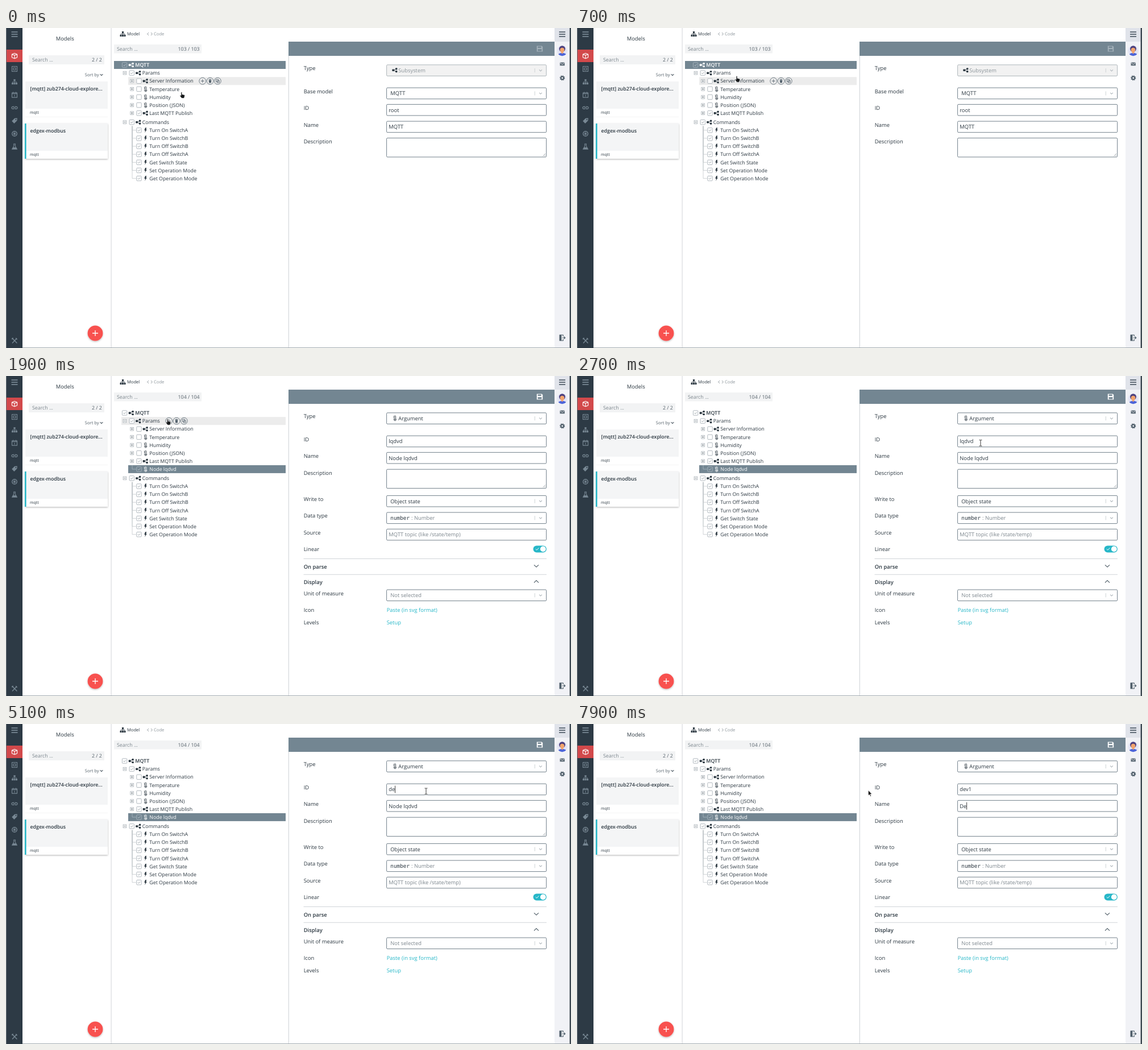
Write an HTML page that moves like this. It is 994 px wide and 563 px high and loops after 8000 ms.

```html
<!DOCTYPE html>
<html lang="en">
<head>
<meta charset="utf-8">
<title>Model editor</title>
<style>
html, body { margin: 0; width: 100%; height: 100%; overflow: hidden; background: #fff; }
svg { display: block; width: 100vw; height: 100vh; }
text { font-family: "Open Sans", "Noto Sans", sans-serif; text-rendering: geometricPrecision; white-space: pre; }
.mono { font-family: "DejaVu Sans Mono", monospace; }
</style>
</head>
<body>
<svg viewBox="0 0 994 563">
  <g id="frame"></g>
  <g id="live"></g>
</svg>
<script>
const LOOP = 8000;
const INK = '#2b3740', SLATE = '#738692', GREY = '#7b858c', EDGE = '#64737e', CYAN = '#27b7c8';
const NAV = '#2d3a45', NAV_ICON = '#788894';

const text = (x, cy, s, size = 9.4, fill = INK, extra = '') =>
  `<text x="${x}" y="${cy + size * 0.36}" font-size="${size}" fill="${fill}" ${extra}>${s}</text>`;
const rect = (x, y, w, h, fill, extra = '') =>
  `<rect x="${x}" y="${y}" width="${w}" height="${h}" fill="${fill}" ${extra}/>`;
const line = (d, stroke, width = 1, fill = 'none') =>
  `<path d="${d}" fill="${fill}" stroke="${stroke}" stroke-width="${width}" stroke-linejoin="round"/>`;
const fillPath = (d, fill) => `<path d="${d}" fill="${fill}" fill-rule="evenodd"/>`;
const circle = (x, y, r, fill, extra = '') => `<circle cx="${x}" cy="${y}" r="${r}" fill="${fill}" ${extra}/>`;
const at = (x, y, s) => `<g transform="translate(${x} ${y})">${s}</g>`;
const BOLD = 'font-weight="600"';

const pen = document.createElement('canvas').getContext('2d');
const widthOf = (s, size) => {
  pen.font = '100px "Open Sans", "Noto Sans", sans-serif';
  return pen.measureText(s).width * size / 100;
};

// Icons, drawn around their centre
const icon = {
  menu: c => line('M-5.5-4H5.5M-5.5 0H5.5M-5.5 4H5.5', c, 1.7),
  cube: c => line('M0-4.6L4.6-2.8V2.8L0 4.8L-4.6 2.8V-2.8ZM-4.6-2.8L0-1L4.6-2.8M0-1V4.8', c, 1.1),
  frame: c => line('M-4.5-4.5H4.5V4.5H-4.5ZM-2-2H2V2H-2Z', c, 1.1),
  sitemap: c => fillPath('M-1.6-4.5H1.6V-1.5H-1.6ZM-5 1.5H-2V4.5H-5ZM-1.5 1.5H1.5V4.5H-1.5ZM2 1.5H5V4.5H2Z', c) +
    line('M0-1.5V1.5M-3.5 1.5V0H3.5V1.5', c, .8),
  calendar: c => line('M-4.5-3.5H4.5V4.5H-4.5ZM-4.5-1.8H4.5M-2.4-5V-3M2.4-5V-3M0 0V2.8', c, 1.1),
  link: c => line('M-.6-2H-3A2 2 0 0 0-3 2H-.6M.6-2H3A2 2 0 0 1 3 2H.6M-2.2 0H2.2', c, 1.2),
  tag: c => fillPath('M-4.8 .6L.2-4.4L4.8-4.8L4.4-.2L-.6 4.8ZM2.3-3.3A1 1 0 1 0 2.4-3.3Z', c),
  globe: c => circle(0, 0, 4.3, 'none', `stroke="${c}" stroke-width="1.3"`) +
    line('M-3.5-2.4L3.5 2.4M3.5-2.4L-3.5 2.4M0-4V4', c, .8) + circle(0, 0, 1.6, c),
  flask: c => line('M-2-4.8H2M-1.2-4.8V-1L-4.4 4.5H4.4L1.2-1V-4.8', c, 1.1) + fillPath('M-2.3 1.3H2.3L4 4.3H-4Z', c),
  tools: c => line('M-4 4.4L4-4M-4.4-4.4L4.4 4.4M-4.8-2.4L-2.4-4.8M2.2-4.4L4.6-2', c, 1.4),
  share: c => rect(-4.6, -1.7, 3.6, 3.6, c, 'rx=".8"') + rect(1.2, -4, 3.2, 3.2, c, 'rx=".7"') +
    rect(1.2, .9, 3.2, 3.2, c, 'rx=".7"') + line('M-2 0L2-2.4M-2 0L2 2.4', c, .9),
  thermo: c => line('M-.8 .8V-3A1.2 1.2 0 0 1 1.6-3V.8A2 2 0 1 1-.8 .8Z', c, .9) +
    circle(.4, 2.3, 1, c) + line('M-2.6-3.4H-1.4M-2.6-1.4H-1.4', c, .7),
  bolt: c => fillPath('M-.4-4.4H2L.9-1.3H2.5L-1.1 4.5L-.2 .5H-2Z', c),
  add: c => line('M-3 0H3M0-3V3', c, .9),
  trash: c => fillPath('M-2.6-2.8H-1L-.7-3.4H.7L1-2.8H2.6V-2H-2.6ZM-2.2-1.6H2.2L1.9 3.3H-1.9Z', c),
  copy: c => line('M-3-3H1.2V1.2H-3ZM-1-1H3V3H-1Z', c, .8, '#ececec'),
  save: c => fillPath('M-5.2-5H3.6L5.2-3.4V5H-5.2ZM-3.4-4V-1.4H2.6V-4ZM-3.4 .8V4H3.4V.8Z', c),
  down: c => line('M-2.4-1.2L0 1.2L2.4-1.2', c, 1.1),
  code: c => line('M-2-2.4L-4.4 0L-2 2.4M2-2.4L4.4 0L2 2.4', c, 1),
  mail: c => rect(-4.2, -2.8, 8.4, 5.8, c, 'rx=".6"') + line('M-4.2-2.4L0 .8L4.2-2.4', '#f1f2f6', .8),
  gear: c => circle(0, 0, 2.4, 'none', `stroke="${c}" stroke-width="2"`) +
    circle(0, 0, 3.9, 'none', `stroke="${c}" stroke-width="1.3" stroke-dasharray="1.6 1.46"`),
  exit: c => line('M1.5-2.4V-5H-4.6V5H1.5V2.4', c, 1.2) + rect(-4.6, -5, 3.2, 10, c) + line('M0 0H5M3-2L5 0L3 2', c, 1.2)
};
const put = (name, x, y, c = INK) => at(x, y, icon[name](c));

function card(y, title, active) {
  return rect(34, y, 145, 62, '#fff', `filter="url(#${active ? 'lift' : 'rest'})"`) +
    rect(34, y, 145, 48, '#f4f5f6') + (active ? rect(33, y, 2.6, 62, CYAN) : '') +
    text(42.5, y + 12.5, title, 8.8, INK, BOLD) + text(42, y + 54.8, 'mqtt', 7);
}

function frame() {
  const shadow = (id, dy, blur, a) => `<filter id="${id}" x="-10%" y="-20%" width="120%" height="150%">
    <feDropShadow dx="0" dy="${dy}" stdDeviation="${blur}" flood-opacity="${a}"/></filter>`;
  let s = `<defs>${shadow('rest', .3, .5, .13)}${shadow('lift', 1.2, 1.8, .28)}</defs>`;
  s += rect(0, 0, 994, 563, '#fff') + rect(0, 0, 29, 563, NAV) + rect(0, 0, 1, 563, '#6a747c');
  s += rect(1, 38, 28, 22, '#d2494b') + put('menu', 15, 11, '#8494a0') + put('cube', 15, 49, '#fff');
  ['frame', 'sitemap', 'calendar', 'link', 'tag', 'globe', 'flask'].forEach((n, i) => {
    s += put(n, 15, 72 + i * 22.8, NAV_ICON);
  });
  s += put('tools', 15, 550, NAV_ICON);

  s += rect(184.5, 0, 1.2, 563, '#d9dcde') + text(87.7, 18.5, 'Models');
  s += rect(40, 48, 133, 16, '#f2f3f4') + text(46, 56, 'Search ...', 8.8, GREY) + text(151, 56, '2 / 2', 8.8, '#56626b');
  s += text(138.8, 82, 'Sort by', 7.6, '#56626b') + put('down', 168, 82.3, '#56626b');
  s += card(94, '[mqtt] zub274-cloud-explore...', false) + card(168, 'edgex-modbus', true);
  s += circle(157, 537, 13.4, '#f8514f', 'filter="url(#lift)"') + line('M152 537H162M157 532V542', '#fff', 1.3);

  s += put('sitemap', 205.5, 10.5) + text(213, 10.5, 'Model', 7.6);
  s += put('code', 253, 10.5, '#8b949a') + text(260, 10.5, 'Code', 7.6, '#8b949a');
  s += rect(190, 29, 154, 15.5, '#f2f3f4') + text(195, 37, 'Search ...', 8.8, GREY);
  s += rect(497, 24, 468, 25, SLATE) + rect(496.8, 49, 1, 514, '#cdd2d5');

  s += rect(965, 0, 29, 563, '#f1f2f6') + rect(965, 0, 27, 24, '#e0e3ea') + put('menu', 978.5, 11, '#3b4a55');
  s += circle(978.5, 40, 9.2, '#e3e4f4') + circle(978.5, 36.6, 5.4, '#4b3f7d') + circle(978.5, 38.6, 3.8, '#f3a46c') +
    fillPath('M971.8 46.3C973 42.8 984 42.8 985.2 46.3A9.2 9.2 0 0 1 971.8 46.3Z', '#4c64d8') +
    fillPath('M976.6 41H980.4V43.6L978.5 45.4L976.6 43.6Z', '#f3a46c');
  s += put('mail', 978.7, 63.3, '#5d6b76') + put('gear', 978.7, 88, '#4d5c68') + put('exit', 978.7, 545, '#4d5c68');
  s += rect(991.6, 0, 2.4, 563, '#3c4851') + rect(29, 562, 963, 1, '#a3abb1');
  return s;
}

const STEP = 14.13;
const action = ['Turn On SwitchA', 'Turn On SwitchB', 'Turn Off SwitchB', 'Turn Off SwitchA',
  'Get Switch State', 'Set Operation Mode', 'Get Operation Mode'];

// Rows: label, level, icon, checked, expander sign
function rowsFor(added) {
  const rows = [['MQTT', 0, 'share', 1, ''], ['Params', 1, 'share', 1, '-'],
    ['Server Information', 2, 'share', 0, '+'], ['Temperature', 2, 'thermo', 0, '+'],
    ['Humidity', 2, 'thermo', 0, '+'], ['Position (JSON)', 2, 'thermo', 0, '+'],
    ['Last MQTT Publish', 2, 'share', 1, '+']];
  if (added) rows.push(['Node lqdvd', 2, 'thermo', 1, '']);
  rows.push(['Commands', 1, 'share', 1, '-'], ...action.map(a => [a, 2, 'bolt', 1, '']));
  return rows;
}

function tree(added, hover) {
  const picked = added ? 'Node lqdvd' : 'MQTT';
  let s = '', y = 65, branch = 0;
  for (const [label, level, kind, checked, sign] of rowsFor(added)) {
    if (label === 'Commands') { y += 1.8; branch = y + 7; }
    const on = label === picked, over = label === hover;
    const left = [190, 203, 215][level], box = 208.6 + level * 12.7, x = 227.3 + level * 12.5;
    const ink = on ? '#fff' : INK, soft = on ? '#a9b6bf' : '#aab2b8';
    if (on || over) s += rect(left, y - 7, 492 - left, 14, on ? SLATE : '#ececec');
    if (sign) {
      const ex = box - 12.4;
      s += at(ex, y, rect(-2.8, -2.8, 5.6, 5.6, '#fff', 'stroke="#a5adb3" stroke-width=".8"') +
        line('M-1.7 0H1.7' + (sign === '+' ? 'M0-1.7V1.7' : ''), '#6b767e', .8));
    } else if (level) {
      s += line(`M222 ${on ? y - 7 : branch}V${y}H229`, on ? '#a9b6bf' : '#c3c8cc', .8);
    }
    s += at(box, y, rect(-4.2, -4.2, 8.4, 8.4, on ? 'none' : '#fff', `rx="1" stroke="${soft}" stroke-width=".9"`) +
      (checked ? line('M-2 0L-.5 1.5L2.2-1.4', on ? '#c6d0d6' : '#8f999f', .9) : ''));
    s += put(kind, x - 7, y, ink) + text(x, y, label, 8.8, ink, level ? '' : BOLD);
    if (over) {
      const end = x + widthOf(label, 8.8) + 16;
      ['add', 'trash', 'copy'].forEach((n, i) => {
        s += at(end + i * 13.3, y, circle(0, 0, 5.9, 'none', 'stroke="#63717b" stroke-width=".9"') + icon[n]('#56646f'));
      });
    }
    y += STEP;
  }
  return s;
}

const label = (y, s) => text(523.7, y, s);
const box = (y, h = 19.6, fill = '#fff', edge = EDGE) =>
  rect(669.6, y - 9.8, 281, h, fill, `rx="1.5" stroke="${edge}" stroke-width=".9"`);
const input = (y, s, fill = INK) => box(y) + text(673.2, y, s, 9.4, fill);
const select = (y, inner, off) => box(y, 19.6, off ? '#f2f2f2' : '#fff', off ? '#a6afb5' : EDGE) + inner +
  line(`M930.3 ${y - 3.6}V${y + 3.6}`, '#c9ced2', .9) + put('down', 940.5, y, '#b3babf');
const area = y => box(y, 33.4) + line(`M944.6 ${y + 22}L949 ${y + 17.6}M947.4 ${y + 22}L949 ${y + 20.4}`, '#77838b', .7);

// An input whose content may be selected or carry a caret
function edit(y, value, mode) {
  const w = widthOf(value, 9.4);
  if (mode === 'all') return box(y) + rect(673.2, y - 6.6, w, 13, '#3390ff') + text(673.2, y, value, 9.4, '#fff');
  return input(y, value) + (mode === 'caret' ? rect(673.2 + w, y - 6.5, .8, 13, '#111') : '');
}

function rootForm() {
  return label(71, 'Type') + select(74.6, put('share', 684, 74.2) + text(690.3, 74.6, 'Subsystem', 9.4, '#8a9399'), true) +
    label(111.4, 'Base model') + select(115, text(676.3, 115, 'MQTT')) +
    label(141, 'ID') + input(144.2, 'root') + label(170.5, 'Name') + input(173.9, 'MQTT') +
    label(199.8, 'Description') + area(203.4);
}

function nodeForm(id, idMode, name, nameMode) {
  return label(71, 'Type') + select(74.6, put('thermo', 684, 74.2) + text(690.3, 74.6, 'Argument')) +
    label(111.4, 'ID') + edit(115, id, idMode) + label(141, 'Name') + edit(144.2, name, nameMode) +
    label(170.5, 'Description') + area(174) +
    label(216.4, 'Write to') + select(220.2, text(676.3, 220.2, 'Object state')) +
    label(246, 'Data type') + select(249.8, text(676.3, 249.8, 'number', 9.4, INK, 'class="mono"') +
      text(713, 249.8, ': Number', 9.4, GREY)) +
    label(275.4, 'Source') + input(279.1, 'MQTT topic (like /state/temp)', GREY) +
    label(304.4, 'Linear') + rect(927.5, 298.4, 23.4, 12, CYAN, 'rx="6"') + circle(944.8, 304.4, 4.9, '#fff') +
    line('M931.8 304.3L933.8 306.2L937.4 302.4', '#fff', 1) +
    rect(523.5, 321, 427.5, .9, '#ccd1d5') + text(523.7, 335.8, 'On parse', 9.4, INK, BOLD) +
    line('M929 332.3L933 336.2L937 332.3', '#4b5963', 1.1) +
    rect(523.5, 348.8, 427.5, .9, '#ccd1d5') + text(523.7, 363, 'Display', 9.4, INK, BOLD) +
    line('M929 363.6L933 359.7L937 363.6', '#4b5963', 1.1) +
    label(382.3, 'Unit of measure') + select(385.8, text(676.3, 385.8, 'Not selected', 9.4, GREY)) +
    label(411.4, 'Icon') + text(669.7, 411.4, 'Paste (in svg format)', 9.4, CYAN) +
    label(434, 'Levels') + text(669.7, 434, 'Setup', 9.4, CYAN);
}

const pointer = {
  hand: line('M3 .4C3.8.4 4.2.9 4.2 1.6V4.4L7.8 5.3C8.6 5.5 9 6.1 8.8 6.9L8.2 9.6C8 10.5 7.3 11.2 6.4 11.2H4.2C3.5 11.2 3 10.9 2.6 10.3L.5 7.3C.1 6.5.9 5.7 1.7 6.2L2.3 6.7V1.6C2.3.9 2.4.4 3 .4Z', '#fff', .6, '#15181a'),
  beam: line('M-2.6-5.2H-.7L0-4.6L.7-5.2H2.6M-2.6 5.2H-.7L0 4.6L.7 5.2H2.6M0-4.6V4.6', '#fff', 2) +
    line('M-2.4-5.2H-.7L0-4.6L.7-5.2H2.4M-2.4 5.2H-.7L0 4.6L.7 5.2H2.4M0-4.6V4.6', '#222', .9),
  arrow: line('M0 0V9.4L2.2 7.4L3.7 10.9L5.2 10.2L3.7 6.9H6.6Z', '#fff', .7, '#111')
};

// Pointer: time, kind, x, y, hovered row
const moves = [
  [0, 'hand', 305.6, 112.3, 'Server Information'],
  [100, 'hand', 308, 148, 'Humidity'],
  [200, 'hand', 306, 173, 'Turn On SwitchA'],
  [300, 'hand', 300.6, 159.6, 'Commands'],
  [400, 'hand', 296, 143, 'Commands'],
  [500, 'hand', 290, 121, 'Position (JSON)'],
  [600, 'hand', 283, 100, 'Temperature'],
  [700, 'hand', 277.8, 84, 'Server Information'],
  [800, 'hand', 280, 77, 'Params'],
  [900, 'hand', 281, 75, 'Params'],
  [2400, 'hand', 308, 87, 'Params'],
  [2700, 'beam', 710, 117.8, ''],
  [2800, 'beam', 730, 115, ''],
  [2900, 'beam', 737, 113, ''],
  [3200, 'beam', 737, 116.4, ''],
  [4100, 'beam', 737.6, 116.6, ''],
  [4200, 'beam', 738.4, 117.4, ''],
  [4300, 'beam', 739, 118.2, ''],
  [6200, 'beam', 742, 126, ''],
  [6300, 'beam', 744, 134, ''],
  [6400, 'beam', 736, 138, ''],
  [6600, 'beam', 612, 131, ''],
  [6700, 'arrow', 512.4, 116.6, '']
];

// Fields: time, ID and its mode, name and its mode
const edits = [
  [0, 'lqdvd', '', 'Node lqdvd', ''],
  [3500, 'lqdvd', 'caret', 'Node lqdvd', ''],
  [3700, 'lqdvd', 'all', 'Node lqdvd', ''],
  [4700, 'd', 'caret', 'Node lqdvd', ''],
  [5100, 'de', 'caret', 'Node lqdvd', ''],
  [5400, 'dev', 'caret', 'Node lqdvd', ''],
  [5800, 'dev1', 'caret', 'Node lqdvd', ''],
  [6400, 'dev1', '', 'Node lqdvd', ''],
  [6600, 'dev1', '', 'Node lqdvd', 'all'],
  [7500, 'dev1', '', 'D', 'caret'],
  [7900, 'dev1', '', 'De', 'caret']
];
const ADDED = 1900;
const current = (table, t) => table.findLast(row => row[0] <= t);

function scene(t) {
  const added = t >= ADDED, n = added ? 104 : 103;
  const [, kind, x, y, hover] = current(moves, t);
  return text(302.6, 37, `${n} / ${n}`, 8.8, '#56626b') + put('save', 939, 36.5, added ? '#fff' : '#a3b0b9') +
    tree(added, hover) + (added ? nodeForm(...current(edits, t).slice(1)) : rootForm()) +
    at(x, y, pointer[kind]);
}

const live = document.getElementById('live');
document.getElementById('frame').innerHTML = frame();
let shown = -1;
function tick() {
  const t = performance.now() % LOOP;
  const beat = Math.floor(t / 100) * 100;
  if (beat !== shown) {
    live.innerHTML = scene(beat);
    shown = beat;
  }
  requestAnimationFrame(tick);
}
tick();
</script>
</body>
</html>
```
